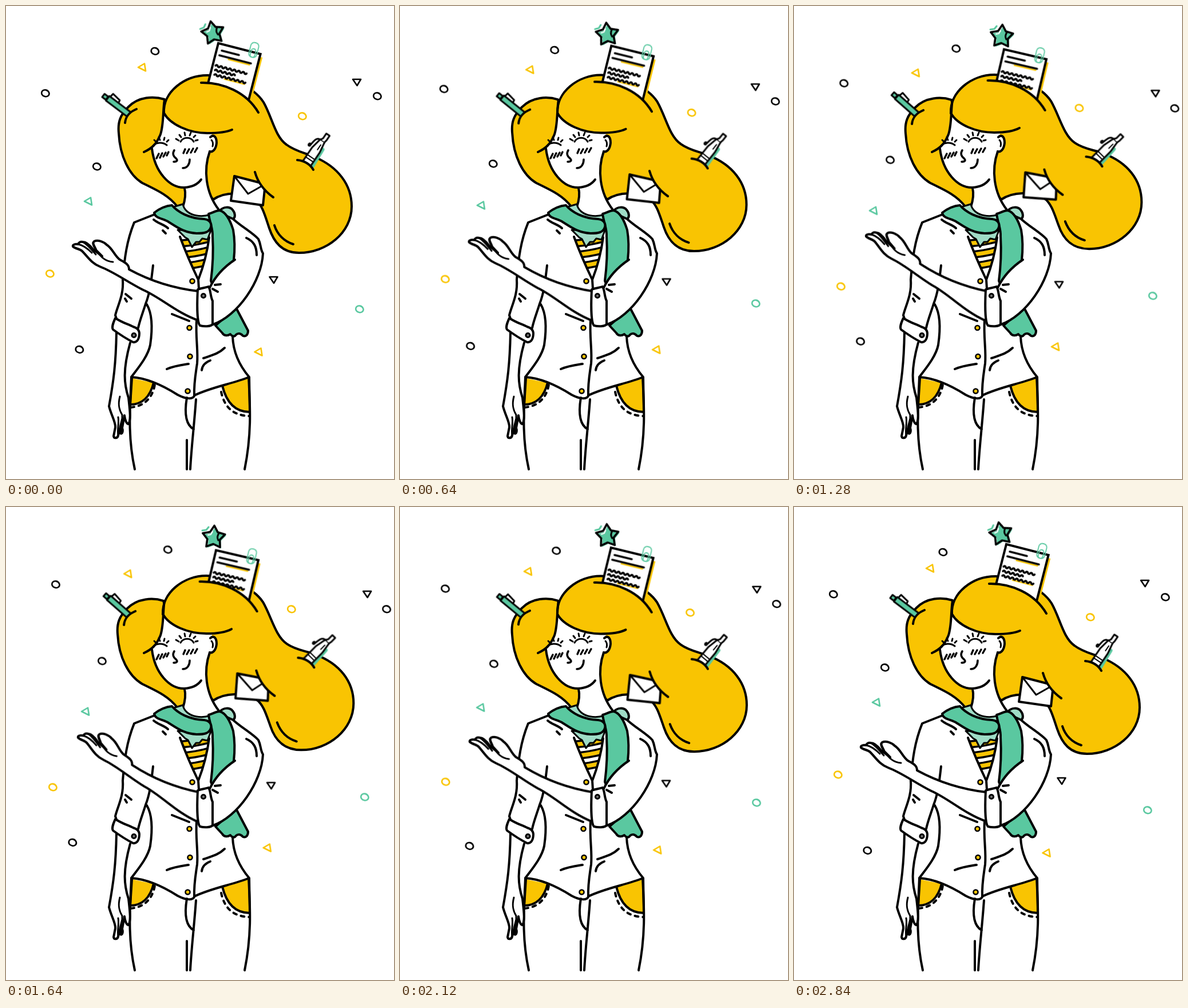
Animation, 678 px wide and 826 px high, one loop 2.88 s. Source, as an HTML page:

```html
<!DOCTYPE html>
<html lang="en">
<head>
<meta charset="utf-8">
<title>Bright ideas</title>
<style>
  html, body { margin: 0; width: 100%; height: 100%; overflow: hidden; background: #fff; }
  svg { display: block; width: 678px; height: 826px; }
  svg { fill: none; stroke: #000; stroke-width: 4; stroke-linecap: round; stroke-linejoin: round; }
  .hair, .sun { fill: #f9c402; }
  .green { fill: #5ac8a0; }
  .mint { fill: #9fdcc6; }
  .white { fill: #fff; }
  .flat { stroke: none; }
  .thin { stroke-width: 3; }
  .fine { stroke-width: 2.6; }
</style>
</head>
<body>
<svg viewBox="0 0 678 826">
  <defs>
    <clipPath id="noteClip"><path d="M341 134C378 133 420 150 441 186H520V0H300V134Z"/></clipPath>
    <clipPath id="penClip"><path d="M208 204C209 192 218 184 228 180L240 120H150V220Z"/></clipPath>
    <clipPath id="markerClip"><path d="M509 269C522 270 532 277 537 286L600 290V200H480V269Z"/></clipPath>
    <clipPath id="mailClip"><path d="M435 290C440 308 450 322 467 334V380H380V280H435Z"/></clipPath>
    <clipPath id="shirtClip"><path d="M304 403C314 430 325 455 336 478C345 455 351 435 355 404Z"/></clipPath>
  </defs>

  <g id="confetti" class="fine"></g>

  <!-- hair and face -->
  <path id="hairLeft" class="hair"/>
  <path id="hairRight" class="hair"/>
  <path class="white flat" d="M275 187C274 215 266 240 254 249C260 290 286 318 312 317C315 330 312 342 309 351C320 368 352 370 372 356C348 325 345 285 356 254L360 222H352C320 222 287 207 275 187Z"/>
  <path d="M255 249C260 290 286 318 312 317C326 316 336 310 341 303M312 318C315 330 312 342 309 351M356 254C345 285 348 325 372 356"/>
  <path class="white" d="M357 229C363 223 368 229 368 239C367 249 362 256 356 254"/>
  <path class="thin" d="M359 234C362 237 362 241 361 245"/>
  <path id="bang"/>
  <path d="M277 164C274 180 276 205 270 224C263 242 254 249 241 255"/>
  <g class="thin">
    <path d="M257 244C262 238 274 237 281 243M305 237C310 228 323 228 328 237"/>
    <path d="M259 234L262 237M267 229L269 234M277 230L276 234M284 234L281 237M297 232L302 235M303 225L306 229M312 221L313 226M323 221L321 226M331 226L328 229M335 234L331 235"/>
    <path stroke-width="3.4" d="M267 258L263 266M273 257L269 265M279 256L275 263M284 255L281 261M313 250L310 257M320 250L316 257M327 249L323 256M334 248L330 255"/>
    <path stroke-width="3.600" d="M294 252C290 258 293 263 297 266C301 270 298 272 293 272M309 283C317 283 321 276 321 268"/>
  </g>
  <path id="shine"/>

  <!-- things tucked into the hair -->
  <g id="notePocket">
    <g clip-path="url(#noteClip)"><g id="note"><g transform="translate(371 65) rotate(14.4)">
      <path class="sun flat" d="M6 5H81V100H6Z"/>
      <path class="white" d="M0 0H76V110H0Z" stroke-linejoin="miter"/>
      <path stroke="#f9c402" stroke-width="2.5" d="M24 23H62M26 58H62"/>
      <path stroke-width="3.5" d="M9 11H40M7 20H64"/>
      <path id="scribble" stroke-width="3.6"/>
      <g stroke="#5ac8a0" stroke-width="1.8">
        <rect x="56" y="-17" width="14" height="26" rx="6"/>
        <rect x="59" y="-6" width="8" height="15" rx="4"/>
      </g>
    </g></g></g>
    <path d="M341 134C378 133 420 150 441 186"/>
  </g>

  <g id="penPocket">
    <g clip-path="url(#penClip)"><g id="pen" class="thin"><g transform="translate(172 157) rotate(37)">
      <path class="white" d="M9 -5L10 -12L26 -10L27 -5"/>
      <path class="green" d="M-2 -3H6V4H-2Z"/>
      <path class="green" d="M7 -5H62V5H7Z"/>
    </g></g></g>
    <path d="M208 204C209 192 218 184 228 180"/>
  </g>

  <g id="markerPocket">
    <g clip-path="url(#markerClip)"><g id="marker" class="thin"><g transform="translate(527 273) rotate(34)">
      <path stroke="#5ac8a0" stroke-width="7" d="M9 -33L11 8"/>
      <path class="white" d="M-4 -46H5L8 -26V12H-8V-26Z"/>
      <path class="white" d="M-3 -46L-1 -50V-60H6V-50L5 -46"/>
      <path d="M-4 -45C-11 -46 -12 -38 -13 -26C-16 -24 -17 -28 -15 -30"/>
      <path stroke-width="2" d="M-8 -11H8M-8 -6H8M2 -38V-28"/>
    </g></g></g>
    <path d="M509 269C522 270 532 277 537 286"/>
  </g>

  <g id="mailPocket">
    <g clip-path="url(#mailClip)"><g id="mail">
      <path class="white" d="M399 297L453 311L449 348L393 340Z"/>
      <path class="thin" d="M399 297L423 328L453 311"/>
    </g></g>
    <path d="M435 290C440 308 450 322 467 334"/>
  </g>

  <g id="star">
    <path id="starFill" class="green flat" transform="translate(2 2)"/>
    <path id="starLine" stroke-width="3.6"/>
    <path class="thin" d="M372 46C369 50 369 54 371 58"/>
    <path stroke="#fff" stroke-width="2" d="M353 49L358 48L361 43"/>
    <path stroke="#5ac8a0" stroke-width="3" d="M343 41L350 40L354 35"/>
  </g>

  <!-- jeans -->
  <path class="sun" d="M258 658C252 682 238 696 217 696L220 650"/>
  <path class="sun" d="M378 663C385 692 400 709 426 709L425 649"/>
  <path stroke-dasharray="6 8" d="M218 701C240 699 256 686 260 661M376 674C382 702 398 715 425 716"/>
  <path d="M219 648C217 700 212 750 225 809M424 648C427 705 429 750 417 809M316 684C311 714 315 732 328 739M332 687C329 730 324 770 322 809M316 758V809"/>

  <!-- hanging arm -->
  <path class="white" d="M193 570C192 625 188 655 180 699C184 715 192 727 191 736L188 751C189 756 195 755 196 750L203 722L200 746C203 749 205 742 203 737L207 715C208 724 211 730 214 730C219 722 216 703 214 684C206 660 204 635 217 588"/>
  <path class="thin" d="M199 682C195 697 198 706 203 714V722M196 718C198 729 194 738 196 750"/>
  <path class="white" d="M191 545C188 552 184 560 187 565C198 573 212 582 222 587C228 588 233 583 233 571C232 564 228 562 222 560C212 555 203 553 191 545Z"/>
  <circle class="thin" cx="223.500" cy="575" r="3.6" fill="#777"/>

  <!-- jacket -->
  <path class="green" d="M366 558L402 527L423 567C423 574 419 578 414 576C410 571 405 571 402 574C399 579 394 576 392 573C386 577 380 575 378 571Z"/>
  <path d="M262 363L224 378C211 410 207 440 204 478C206 505 195 523 191 540L193 546M257 453C254 478 252 500 244 520C239 536 234 548 231 562M246 521C256 538 256 565 252 592C248 612 231 632 219 648C250 650 278 665 300 679C315 687 328 687 329 680C360 665 395 660 425 648C408 628 397 605 396 577M333 548C331 580 336 600 334 624C331 645 328 660 329 681"/>
  <path d="M258 373C266 380 276 381 283 388M274 392L279 397M290 538L320 550M281 634C295 628 306 627 319 625M345 615C360 610 372 607 382 597M342 636C343 627 349 622 357 619M209 503L219 511M208 511L211 516"/>

  <!-- striped shirt and scarf -->
  <g id="stripes" clip-path="url(#shirtClip)"></g>
  <path d="M304 403C314 430 325 455 336 478L337 494M355 404C351 435 345 455 336 478"/>
  <path class="mint thin" d="M300 391L313 404L318 407L325 421L332 412L338 412L343 406L352 408L358 392Z"/>
  <path class="mint thin" d="M292 351L309 346C313 367 346 374 371 357L358 374L322 372Z"/>
  <path class="mint" d="M374 357C380 350 391 350 396 356C401 362 401 369 397 372L382 365Z"/>
  <path class="green" d="M354 363C362 361 366 357 374 357C386 361 393 378 397 391C400 408 400 425 398 444L362 490L358 480C362 450 362 420 361 402C362 390 356 378 354 363Z"/>
  <path class="green" d="M259 361C268 354 278 349 290 348C300 360 320 371 346 372C355 373 360 379 358 386C355 396 346 397 333 397C312 396 300 387 284 377C275 371 260 371 259 361Z"/>

  <!-- folded sleeve -->
  <path class="white flat" d="M400 443C382 455 366 471 356 492L360 556C405 541 447 480 449 432L425 440Z"/>
  <path d="M400 443C382 455 366 471 356 492M398 373C414 387 431 396 441 407C446 417 444 424 449 432C447 480 405 541 362 556M420 405C433 411 438 420 438 435M365 487L375 486M361 494L370 499"/>

  <!-- offered hand -->
  <g id="arm">
    <path class="white" d="M336 498C292 493 252 480 215 460C215 451 208 448 199 443C190 437 186 423 176 417C170 411 160 408 154 411C150 414 154 420 158 427L168 437L152 425C146 417 140 412 134 412C130 411 127 413 126 416C121 415 116 417 117 420C121 424 129 424 133 428C143 438 149 449 164 455C190 465 212 482 240 496C270 509 300 537 336 549"/>
    <path class="thin" d="M158 427C166 439 174 446 187 447M126 416C136 418 143 424 150 431M134 412C143 417 149 425 157 434M152 414L157 424"/>
  </g>
  <path class="white" d="M335 495C342 492 349 492 354 490C358 497 357 507 361 515V556C357 560 346 560 339 558C333 552 334 514 335 495Z"/>
  <circle class="thin" cx="345" cy="506" r="3.6" fill="#777"/>
  <g class="sun fine">
    <circle cx="325.500" cy="480.500" r="4"/><circle cx="320.500" cy="562" r="4"/>
    <circle cx="321.500" cy="612" r="4"/><circle cx="317.500" cy="672.500" r="4"/>
  </g>
</svg>
<script>
const byId = id => document.getElementById(id);
const INK = '#000', SUN = '#f9c402', GREEN = '#5ac8a0';

// Half a sine swing out, then the same way back: 2880 ms in all.
const swing = {
  duration: 1440, iterations: Infinity, direction: 'alternate',
  easing: 'cubic-bezier(.364, 0, .636, 1)'
};

function sway(el, dx, dy, angle = 0, pivot = [0, 0]) {
  el.style.transformOrigin = `${pivot[0]}px ${pivot[1]}px`;
  el.animate({ transform: [
    'translate(0px, 0px) rotate(0deg)',
    `translate(${dx}px, ${dy}px) rotate(${angle}deg)`
  ] }, swing);
}

function morph(id, from, to) {
  const el = byId(id);
  el.setAttribute('d', from);
  el.animate({ d: [`path("${from}")`, `path("${to}")`] }, swing);
}

// kind, colour, x, y, travel x, travel y
const confetti = [
  ['o', INK, 260.5, 78.5, 23.6, -4.7],
  ['<', SUN, 238, 107, -26, 10],
  ['o', INK, 69, 152, 19, -18],
  ['v', INK, 613, 133, 19, 20],
  ['o', INK, 649, 157, 17, 22],
  ['o', SUN, 518, 192, -20, -14.7],
  ['o', INK, 159, 280, 9.5, -12],
  ['<', GREEN, 144, 341, -5.2, 16.8],
  ['o', SUN, 77, 467, 5.3, 23],
  ['v', INK, 467.5, 478, -4.7, 8.6],
  ['o', GREEN, 618, 529, 9.4, -24],
  ['<', SUN, 441.5, 604, 16, -9.4],
  ['o', INK, 128.5, 599.5, -12.6, -14.7]
];
const outlines = {
  o: 'M-6 -3C-3 -7 4 -6 6 -1C8 4 3 7 -1 6C-6 5 -8 1 -6 -3Z',
  '<': 'M-7 0L4 -6.5L6 6.5Z',
  v: 'M-7 -5H7L.5 6Z'
};
for (const [kind, colour, x, y, dx, dy] of confetti) {
  byId('confetti').insertAdjacentHTML('beforeend',
    `<g><path transform="translate(${x} ${y})" stroke="${colour}" d="${outlines[kind]}"/></g>`);
  sway(byId('confetti').lastChild, dx, dy);
}

// Outlined yellow bands across the shirt.
for (const y of [410, 430, 450]) {
  const band = `M300 ${y + 5}Q335 ${y + 3} 362 ${y - 6}`;
  byId('stripes').insertAdjacentHTML('beforeend',
    `<path stroke-width="14" d="${band}"/><path stroke="${SUN}" stroke-width="7" d="${band}"/>`);
}

// Star drawn upright, tilted at the start of the swing.
const starPath = 'M' + Array.from({ length: 10 }, (_, i) => {
  const r = i % 2 ? 11.5 : 20.5, a = (i * 36 - 87) * Math.PI / 180;
  return `${(363 + r * Math.cos(a)).toFixed(1)} ${(53 + r * Math.sin(a)).toFixed(1)}`;
}).join('L') + 'Z';
byId('starFill').setAttribute('d', starPath);
byId('starLine').setAttribute('d', starPath);
byId('star').style.transformOrigin = '363px 53px';
byId('star').animate({ transform: [
  'translate(-1.5px, -6px) rotate(-14deg)',
  'translate(0px, .4px) rotate(1deg)'
] }, swing);

const wave = (x, y, humps) => `M${x} ${y}q2 -3 4 0` + 't4 0'.repeat(humps);
byId('scribble').setAttribute('d', wave(5, 39, 13) + wave(6, 47, 8) + wave(7, 55, 13));

morph('hairLeft',
  'M277 163C258 157 232 158 214 176C200 190 195 202 197 222C199 262 215 295 238 309C262 321 284 330 299 350L325 345L300 250Z',
  'M275 164C257 158 230 159 212 177C198 191 193 203 195 223C197 262 214 295 238 309C262 321 284 330 299 350L325 345L300 250Z');
morph('hairRight',
  'M276 187C274 150 312 121 352 121C385 121 432 140 450 168C465 194 470 228 490 242C506 254 524 257 540 264C580 281 604 312 604 350C604 396 560 431 512 431C482 431 468 412 460 388C452 364 448 348 436 338C416 324 382 324 362 338L330 300L300 240Z',
  'M274 187C272 150 310 120 350 120C383 120 431 139 449 166C464 192 471 226 491 239C507 250 525 251 541 257.500C583 273 607.500 304 607.500 342.500C607.500 388 564 424 516 424C485 424 470 406 462 382C454 360 450 346 438 336C417 323 382 324 362 338L330 300L300 240Z');
morph('bang',
  'M276 187C287 207 320 222 352 222C372 222 386 220 395 216',
  'M274 187C285 207 318 221 350 221C370 221 385 218 394 213');
morph('shine',
  'M469 383C474 399 486 411 502 416',
  'M474 376C480 392 492 404 508 409');

sway(byId('notePocket'), -2.5, -4);
sway(byId('note'), -1.7, 15, -1.3, [371, 65]);
sway(byId('penPocket'), -2, 2);
sway(byId('pen'), 2, -2, 4.5, [212, 188]);
sway(byId('markerPocket'), 1.5, -6);
sway(byId('marker'), 0, 0, 11, [528, 276]);
sway(byId('mailPocket'), 2.5, -4.5);
sway(byId('mail'), 5.9, -1.8, -4, [393, 340]);
sway(byId('arm'), 0, 0, 4.9, [335, 520]);
</script>
</body>
</html>
```
